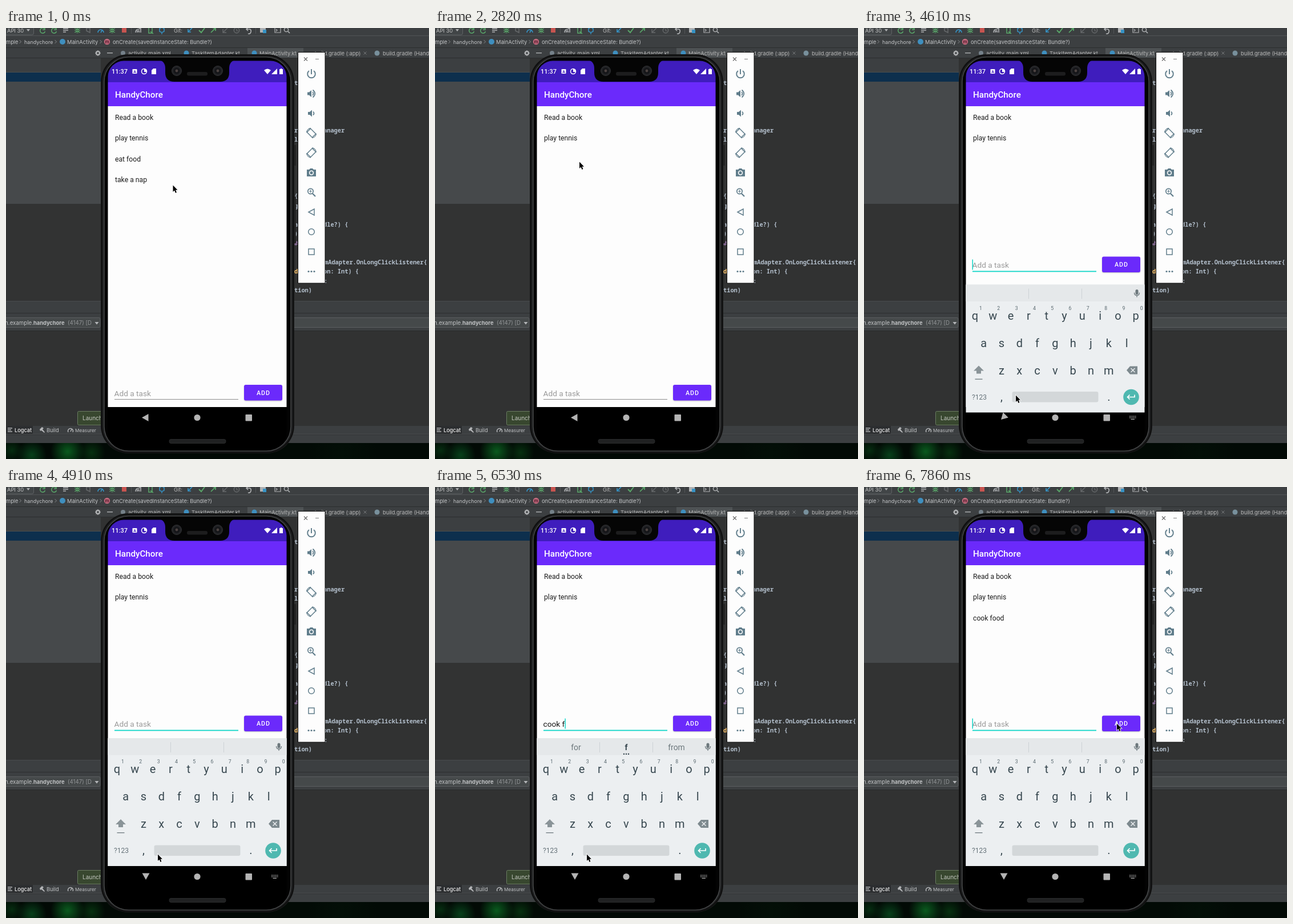
An HTML page with a canvas that plays this animation: 741x755 px, repeating every 8000 ms.

```html
<!DOCTYPE html>
<html lang="en">
<head>
<meta charset="utf-8">
<title>To-do app in an emulator</title>
<style>
html, body { margin: 0; width: 741px; height: 755px; overflow: hidden; background: #313233; }
canvas { display: block; }
</style>
</head>
<body>
<canvas id="stage" width="741" height="755"></canvas>
<script>
const LOOP = 8000, STEP = 147;
const UI = 'Inter, sans-serif', APP = 'Roboto, sans-serif', CODE = '"Noto Sans Mono", monospace';
const PURPLE = '#6b2afb', TEAL = '#12d5c8', SLATE = '#607d8b', KEY = '#37474f', PANEL = '#3c3f41', NAV = '#b4b4b4';

const stage = document.getElementById('stage').getContext('2d');
const backdrop = document.createElement('canvas');
backdrop.width = 741;
backdrop.height = 755;
let c = backdrop.getContext('2d');

function rect(x, y, w, h, color) {
  c.fillStyle = color;
  c.fillRect(x, y, w, h);
}
function round(x, y, w, h, r, fill, stroke, width = 1) {
  c.beginPath();
  c.roundRect(x, y, w, h, r);
  if (fill) { c.fillStyle = fill; c.fill(); }
  if (stroke) { c.strokeStyle = stroke; c.lineWidth = width; c.stroke(); }
}
function disc(x, y, r, fill, stroke, width) {
  round(x - r, y - r, 2 * r, 2 * r, r, fill, stroke, width);
}
function text(s, x, y, size, color, { font = UI, weight = 400, align = 'left', spacing = 0 } = {}) {
  c.font = `${weight} ${size}px ${font}`;
  c.textAlign = align;
  c.letterSpacing = spacing + 'px';
  c.fillStyle = color;
  c.fillText(s, x, y);
}
// Path centred on (x, y); stroked when a width is given, filled otherwise.
function icon(x, y, d, color, width = 0, angle = 0) {
  c.save();
  c.translate(x, y);
  c.rotate(angle);
  const path = new Path2D(d);
  c.fillStyle = c.strokeStyle = color;
  c.lineWidth = width;
  if (width) c.stroke(path); else c.fill(path, 'evenodd');
  c.restore();
}

function drawToolbar() {
  const green = '#59a869', blue = '#3592c4', gray = '#afb1b3', dim = '#66696b';
  const refresh = 'M3 -3A4.5 4.5 0 1 0 4.5 2M4 -5V-1H0';
  const bug = 'M-3 -3Q0 -6 3 -3V3Q0 7 -3 3ZM-5 -3H5V-2H-5ZM-5 0H5V1H-5ZM-5 3H5V4H-5Z';
  rect(0, 0, 741, 13, PANEL);
  round(-5, -8, 53.5, 20, 3, '#414547', '#5f6264');
  text('API 30', 2, 8, 9.3, '#c4c4c4');
  icon(39, 4, 'M-3 -2H3L0 2Z', gray);
  icon(64, 4, refresh, green, 1.5);
  icon(84, 4, refresh, green, 1.5);
  icon(104, 4, 'M-4 -3H5M-4 0H5M-4 3H1', gray, 1.3);
  icon(125, 4, bug, green);
  icon(145, 4, 'M-4 -4H2V4L-4 1Z', dim, 1.5);
  icon(166, 6, 'M-5 2A5 5 0 0 1 5 2M0 2L3 -3', blue, 1.7);
  icon(186, 4, bug, green);
  rect(203, 0, 8, 8, '#c75450');
  rect(219, 0, 1, 10, '#515456');
  icon(232, 4, 'M-5 4Q-5 -2 1 -2L4 -5V4M-2 4V1H1V4', gray, 1.6);
  icon(253, 4, 'M-3 -6H3V5H-3ZM0 2L5 6', green, 1.5);
  icon(273, 4, 'M0 -5L4 -3V2L0 4L-4 2V-3ZM0 4V7', blue, 1.5);
  text('Git:', 294, 8, 9.3, '#bbb');
  icon(322, 4, 'M4 -4L-3 3M-3 -2V3H2', blue, 1.7);
  icon(343, 4, 'M-5 0L-1 4L5 -4', green, 1.9);
  icon(363, 4, 'M-4 4L4 -4M-1 -4H4V1', green, 1.7);
  icon(384, 4, 'M-4 4L4 -4M-4 -2V4H2', dim, 1.4);
  disc(404, 4, 4.7, null, dim, 1.4);
  icon(404, 4, 'M0 -3V1H3', dim, 1.2);
  icon(425, 4, 'M-4 -2H2Q5 -1 4 3T-1 6M-1 -5L-4 -2L-1 1', gray, 1.6);
  rect(437, 0, 1, 10, '#515456');
  icon(450, 4, 'M-5 -4H5V4H-5Z', gray);
  rect(450, 3, 6, 6, blue);
  icon(476, 4, 'M-5 -5H5V4H-5ZM-3 -2L-1 0L-3 2', gray, 1.2);
  disc(491, 3, 3.6, null, gray, 1.5);
  icon(495, 7, 'M-1 -1L2 2', gray, 1.7);
}

function drawEditor() {
  rect(0, 0, 741, 755, '#313232');
  drawToolbar();
  rect(0, 13, 741, 22, PANEL);
  rect(0, 13, 741, 1, '#515456');
  rect(0, 34, 741, 1, '#2c2e2f');
  rect(0, 35, 741, 17, PANEL);

  const crumb = '#c3c5c7';
  text('mple', 0, 27.5, 9.3, crumb);
  text('handychore', 32, 27.5, 9, crumb);
  for (const x of [25, 87, 166]) icon(x, 24, 'M-1.5 -3L1.5 0L-1.5 3', '#85888a', 1);
  disc(99, 24, 5, '#3f8fbf');
  text('MainActivity', 107, 27.5, 9.3, crumb);
  disc(177, 24, 5.2, '#c2697d');
  text('m', 177, 27, 8, '#412', { align: 'center', weight: 600 });
  text('onCreate(savedInstanceState: Bundle?)', 187, 27.5, 9.3, crumb);

  disc(161, 44, 3.2, null, '#afb1b3', 2);
  icon(161, 44, 'M0 -5V5M-5 0H5M-3.4 -3.4L3.4 3.4M3.4 -3.4L-3.4 3.4', '#afb1b3', 1);
  disc(161, 44, 1.4, PANEL);
  rect(177, 43, 10, 1.4, '#afb1b3');
  rect(423, 35, 98, 17, '#4e5254');
  disc(205, 44, 4, '#75818a');
  text('activity_main.xml', 214, 47.5, 9.3, '#bbb');
  disc(316, 44, 4.5, '#3f8fbf');
  text('TaskItemAdapter.kt', 325, 47.5, 9.3, '#bbb');
  disc(435, 44, 4.5, '#3f8fbf');
  text('MainActivity.kt', 444, 47.5, 9.3, '#bbb');
  text('build.gradle (:app)', 541, 47.5, 9.3, '#bbb');
  icon(629, 44, 'M-2.5 -2.5L2.5 2.5M2.5 -2.5L-2.5 2.5', '#77797b', 1);
  disc(650, 44, 4.5, '#78909c');
  text('build.gradle (HandyChore)', 660, 47.5, 9.3, '#bbb');

  rect(0, 52, 166, 26, PANEL);
  rect(0, 52, 741, 1, '#2b2d2e');
  rect(0, 77, 166, 1, '#4b4e50');
  rect(0, 78, 166, 16, '#0d2f4d');
  rect(0, 94, 166, 214, '#46494b');
  rect(0, 308, 166, 170, '#323333');

  const code = (s, x, y, color = '#b4c0cd') => text(s, x, y, 10.33, color, { font: CODE, weight: 600 });
  code('t', 505, 100);
  code('r', 505, 182.5);
  code('anager', 556, 182.5);
  code('l', 505, 198.5);
  code('{', 505, 298);
  code('g', 505, 314.5);
  code('a', 505, 347.5);
  code('dle?) {', 556, 347.5);
  code(')', 505, 364);
  code('#', 505, 380.5, '#9876aa');
  code('mAdapter.OnLongClickListener{', 558, 413.5);
  code('d', 505, 430, '#ffc66d');
  code('on: Int) {', 556, 430);
  code(':', 557, 446.5);
  code('tion)', 505, 463);
}

function drawBottomPanels() {
  rect(0, 478, 741, 52, PANEL);
  rect(0, 478, 741, 1, '#484b4d');
  rect(0, 499, 741, 1, '#2c2e2f');
  round(-5, 507.5, 170, 17, 2, '#45494a', '#5b5e60');
  rect(500, 507, 241, 18, '#45494a');
  rect(500, 507, 241, 1, '#5b5e60');
  rect(500, 524, 241, 1, '#5b5e60');
  rect(0, 530, 741, 1, '#282a2b');
  const grey = '#c1c3c5';
  text('m.example.', 48, 520, 9.7, grey, { align: 'right' });
  text('handychore', 48, 520, 9.3, grey, { weight: 700 });
  text('(4147) [D', 108, 520, 9.7, '#929597');
  rect(151, 509, 13, 14, '#45494a');
  icon(159, 517, 'M-3.5 -2H3.5L0 2.5Z', '#b4b6b8');

  round(125.5, 671.5, 80, 24, 2, '#38472f', '#6a7c61');
  text('Launch succeeded', 134, 687, 10, '#c4c8c1');

  rect(0, 697, 741, 30, PANEL);
  rect(0, 697, 47, 14, '#2c2e30');
  rect(0, 711, 741, 1, '#4b4e50');
  rect(0, 712, 741, 1, '#303233');
  icon(7, 704, 'M-4 -3H4M-4 0H2M-4 3H4', '#b4b6b8', 1.4);
  text('Logcat', 15, 707.5, 9.2, '#f0f0f0', { weight: 500 });
  icon(63, 704, 'M-4 -1L0 -5L3 -3L1 -1L5 4L4 5L-1 1L-3 2Z', '#b4b6b8');
  text('Build', 71, 707.5, 9.3, grey);
  icon(113, 705, 'M-4 3A4.5 4.5 0 1 1 4 3M0 2L2 -2', '#b4b6b8', 1.5);
  text('Measurer', 121, 707.5, 8.2, grey);

  rect(0, 727, 741, 28, '#020a05');
  for (const [x, y, r, color] of [[108, 742, 30, '#0a5a1e'], [45, 748, 26, '#07401a'], [10, 740, 20, '#052c10'], [150, 744, 24, '#06300f'], [590, 745, 60, '#030f07']]) {
    const glow = c.createRadialGradient(x, y, 0, x, y, r);
    glow.addColorStop(0, color);
    glow.addColorStop(1, color + '00');
    rect(x - r, 727, 2 * r, 28, glow);
  }
}

function drawPhone() {
  rect(504, 205, 4, 36, '#242424');
  rect(504, 295, 4, 82, '#242424');
  round(166, 46, 339, 699, 48, '#1f2021');
  round(167.5, 47.5, 336, 696, 47, null, '#0e0e0e', 2);
  round(172, 51, 327, 690, 43, '#060606', '#505253', 1.2);
  round(174, 53, 323, 686, 41, '#030303');

  c.save();
  c.beginPath();
  c.roundRect(178.5, 57.5, 313, 681, [28, 28, 30, 30]);
  c.clip();
  rect(178, 57, 314, 38, '#3f1dbd');
  rect(178, 95, 314, 42, PURPLE);
  rect(178, 137, 314, 527, '#fdfdfd');
  rect(178, 664, 314, 75, '#000');
  c.restore();
  icon(335, 57, 'M-69 -1Q-56 0 -56 14V21Q-56 37 -40 37H40Q56 37 56 21V14Q56 0 69 -1Z', '#050505');
  for (const x of [299, 371]) {
    disc(x, 75, 8.5, '#222326', '#303133');
    disc(x, 75, 5.5, '#151619');
    disc(x, 75, 2.4, '#4a4140');
  }
  round(317, 77, 36, 6.5, 3, '#1d1d1e');
  round(286, 720.5, 99, 7, 3, '#202122', '#2a2b2c');

  text('11:37', 185, 80, 11, '#fff', { font: APP, weight: 500 });
  round(221.5, 72, 8, 8, 1, '#fff');
  text('A', 225.5, 79, 7, '#3f1dbd', { font: APP, weight: 700, align: 'center' });
  disc(242, 76, 4.5, null, '#fff', 1.5);
  icon(242, 76, 'M0 -4H4V1H0Z', '#fff');
  icon(259, 76, 'M-1 -5H4V5H-4V-2Z', '#fff');
  icon(458, 76, 'M0 5L-6 -2Q0 -7 6 -2Z', '#fff');
  icon(470, 76, 'M-5 5L5 -5V5Z', '#fff');
  icon(482, 76, 'M-3 -4H-1V-5H1V-4H3V5H-3Z', '#fff');
  text('HandyChore', 191, 122, 15.2, '#fff', { font: APP, weight: 500 });

  disc(335, 682.5, 5.6, NAV);
  round(419.5, 677, 11.5, 11.5, 1, NAV);
}

function drawEmulatorBar() {
  round(511.5, 42.5, 47.5, 404.5, 0, '#fdfdfd', '#0c0c0c');
  icon(525, 54.5, 'M-3 -3L3 3M3 -3L-3 3', '#666', 1.1);
  icon(545, 54.5, 'M-3 0H3', '#888', 1.1);
  const x = 535, speaker = 'M-6 -2.5H-3L1 -6V6L-3 2.5H-6Z';
  icon(x, 80, 'M-4 -5A6.8 6.8 0 1 0 4 -5M0 -8V1', SLATE, 1.9);
  icon(x - 1, 115, speaker, SLATE);
  icon(x - 1, 115, 'M3 -3Q6 0 3 3M3.5 -6.5Q11 0 3.5 6.5', SLATE, 1.7);
  icon(x, 149.5, speaker, SLATE);
  icon(x, 149.5, 'M3 -3Q6 0 3 3', SLATE, 1.7);
  for (const [y, flip] of [[184, 1], [218.5, -1]]) {
    icon(x, y, 'M-6.5 -4.5H6.5V4.5H-6.5Z', SLATE, 1.5, flip * Math.PI / 4);
    icon(x, y, `M${-8.5 * flip} -1A8.5 8.5 0 0 ${flip > 0 ? 1 : 0} ${-1 * flip} -8.5M${8.5 * flip} 1A8.5 8.5 0 0 ${flip > 0 ? 1 : 0} ${flip} 8.5`, SLATE, 1.3);
  }
  icon(x, 253, 'M-8 -5H-4L-2 -7H2L4 -5H8V7H-8ZM0 -3.5A4.2 4.2 0 1 0 0 4.9A4.2 4.2 0 1 0 0 -3.5Z', SLATE);
  disc(x, 253.7, 2.6, SLATE);
  disc(x - 1.5, 286, 4.7, null, SLATE, 1.7);
  icon(x, 288, 'M2 2L7 7', SLATE, 2.2);
  icon(x, 286, 'M-4 0H1M-1.5 -2.5V2.5', SLATE, 1.1);
  icon(x, 322.5, 'M-5 0L5 -5.5V5.5Z', SLATE, 1.5);
  disc(x, 357, 5.3, null, SLATE, 1.5);
  round(x - 5, 387, 10, 10, 0, null, SLATE, 1.5);
  for (const dx of [-5, 0, 5]) disc(x + dx, 426.5, 1.6, SLATE);
}

// Latest row whose time has come.
const latest = (rows, t) => rows.findLast(row => row[0] <= t);

// time, typed text, caret shown, suggestions
const fieldStates = [
  [0, '', 0], [4460, '', 1], [4910, '', 0], [5350, '', 1],
  [5500, 'c', 1], [5640, 'c', 1, 'can c city'], [5790, 'co', 1, 'can c city'],
  [5940, 'coo', 1, 'can co city'], [6090, 'cook', 1, 'cool coo cook'],
  [6230, 'cook', 1, 'cool cook book'], [6380, 'cook ', 1, 'cool cook book'],
  [6530, 'cook f', 1, 'for f from'], [6680, 'cook foo', 1, 'for foo food'],
  [6820, 'cook food', 1, 'good food Good'], [7420, 'cook food', 0, 'good food Good'],
  [7560, 'cook food', 1, 'good food Good'], [7710, '', 1, 'good food Good'], [7860, '', 1]
];
// time, keyboard offset, turn of the back arrow in degrees
const keyboardStates = [[0, null, 0], [4610, 9.5, -45], [4760, 1, -85], [4910, 0, -90]];
// start, steps, destination
const pointerLegs = [[150, 2, 290.5, 273], [740, 2, 263.5, 260.5], [2080, 3, 253, 234.5], [3420, 7, 266, 643.5], [6970, 4, 443, 414.5]];

function drawList(t) {
  const items = ['Read a book', 'play tennis'];
  if (t < 2820) items.push('eat food');
  if (t < 1330) items.push('take a nap');
  if (t >= 7710) items.push('cook food');
  items.forEach((s, i) => text(s, 191, Math.round(160.6 + 36.5 * i), 12.2, '#1c1c1c', { font: APP }));
}

function drawField(t, y) {
  const [, typed, caret] = latest(fieldStates, t);
  text(typed || 'Add a task', 189.5, y + 19.5, 13.7, typed ? '#151515' : '#9b9b9b', { font: APP });
  const word = typed.split(' ').pop();
  const end = 189.5 + (typed ? c.measureText(typed).width : 0);
  if (word.length > 2) {
    const w = c.measureText(word).width;
    rect(end - w, y + 21, w, 1, '#222');
  }
  if (caret) rect(end, y + 5, 1.5, 18, TEAL);
  if (t < 4460) rect(190, y + 25, 217, 1, '#8d8d8d');
  else rect(190, y + 25, 217, 1.8, TEAL);

  c.save();
  c.shadowColor = 'rgba(0,0,0,.25)';
  c.shadowBlur = 2;
  c.shadowOffsetY = 1;
  round(417, y, 67, 27.5, 3, t >= 7560 && t < 7710 ? '#8149fc' : PURPLE);
  c.restore();
  text('ADD', 439, y + 17.5, 10.7, '#fff', { font: APP, weight: 500, spacing: 0.95 });
}

function drawKeyboard(t, offset) {
  c.save();
  c.translate(0, offset);
  rect(178.5, 440, 313, 224, '#eceff1');
  rect(178.5, 440, 313, 29.5, '#e5e8ea');
  for (const x of [288, 381]) rect(x, 447, 1, 18, '#cdd2d5');
  const words = latest(fieldStates, t)[3];
  if (words) {
    words.split(' ').forEach((s, i) => text(s, 247 + 88 * i, 461, 13.9, i === 1 ? KEY : '#6d787d',
      { font: APP, weight: i === 1 ? 700 : 400, align: 'center' }));
    for (const x of [331, 335, 339]) disc(x, 467.8, 1.2, KEY);
  }
  round(475.5, 448.5, 5, 9, 2.5, '#6d787d');
  icon(478, 455, 'M-4.5 -1Q-4.5 4 0 4T4.5 -1M0 4V7', '#6d787d', 1.3);

  const mid = { font: APP, align: 'center' };
  const row = (keys, x, y) => [...keys].forEach((k, i) => text(k, x + 31.3 * i, y, 20, KEY, mid));
  row('qwertyuiop', 194.5, 501);
  row('asdfghjkl', 209.7, 549);
  row('zxcvbnm', 241, 597);
  [...'1234567890'].forEach((k, i) => text(k, 204.5 + 31.3 * i, 484, 8.7, '#58676e', mid));
  icon(201, 590, 'M0 -8L9 1H4V6H-4V1H-9Z', '#8a9498');
  rect(194.5, 605, 13, 1.3, '#6d787d');
  icon(470, 590, 'M-10 0L-4 -7H9V7H-4ZM-3 -3L0 0L-3 3L-2 4L1 1L4 4L5 3L2 0L5 -3L4 -4L1 -1L-2 -4Z', '#7d898e');
  text('?123', 202, 641, 12, '#647178', mid);
  text(',', 241, 643, 20, KEY, mid);
  text('.', 429, 643, 20, KEY, mid);
  round(259.5, 627.5, 151, 18.5, 3, '#d3d7d9');
  disc(468, 637, 13.8, '#4fb8b0');
  icon(468, 637, 'M6 -4V0H-6M-2.5 -4L-6.5 0L-2.5 4', '#fff', 1.7);
  c.restore();
}

function drawKeyboardIcon() {
  for (let i = 0; i < 10; i++) rect(465 + i % 5 * 2.5, i < 5 ? 679.5 : 682, 1.4, 1.4, NAV);
  rect(467.5, 684.8, 6.4, 1.2, NAV);
}

function pointerAt(t) {
  let x = 292.5, y = 275.5;
  for (const [start, steps, toX, toY] of pointerLegs) {
    const p = Math.min(steps, Math.max(0, Math.floor((t - start) / STEP) + 1)) / steps;
    const ease = p * p * (3 - 2 * p);
    x += (toX - x) * ease;
    y += (toY - y) * ease;
  }
  return [x, y];
}

function drawPointer(t) {
  const [x, y] = pointerAt(t), arrow = 'M0 0V11.4L2.6 9L4.5 13.4L6.4 12.6L4.6 8.3H8Z';
  icon(x, y, arrow, '#fff', 1.6);
  icon(x, y, arrow, '#000');
}

function render(now) {
  const t = now % LOOP;
  const [, offset, turn] = latest(keyboardStates, t);
  c.drawImage(backdrop, 0, 0);
  drawList(t);
  drawField(t, offset === null ? 625 : 400.5);
  if (offset !== null) drawKeyboard(t, offset);
  icon(245, turn ? 681 : 682.5, 'M-7 0L4.5 -6.5V6.5Z', NAV, 0, turn * Math.PI / 180);
  if (t >= 4460) drawKeyboardIcon();
  drawPointer(t);
}

drawEditor();
drawBottomPanels();
drawPhone();
drawEmulatorBar();
c = stage;
const begin = performance.now();
(function tick() {
  render(performance.now() - begin);
  requestAnimationFrame(tick);
})();
</script>
</body>
</html>
```
